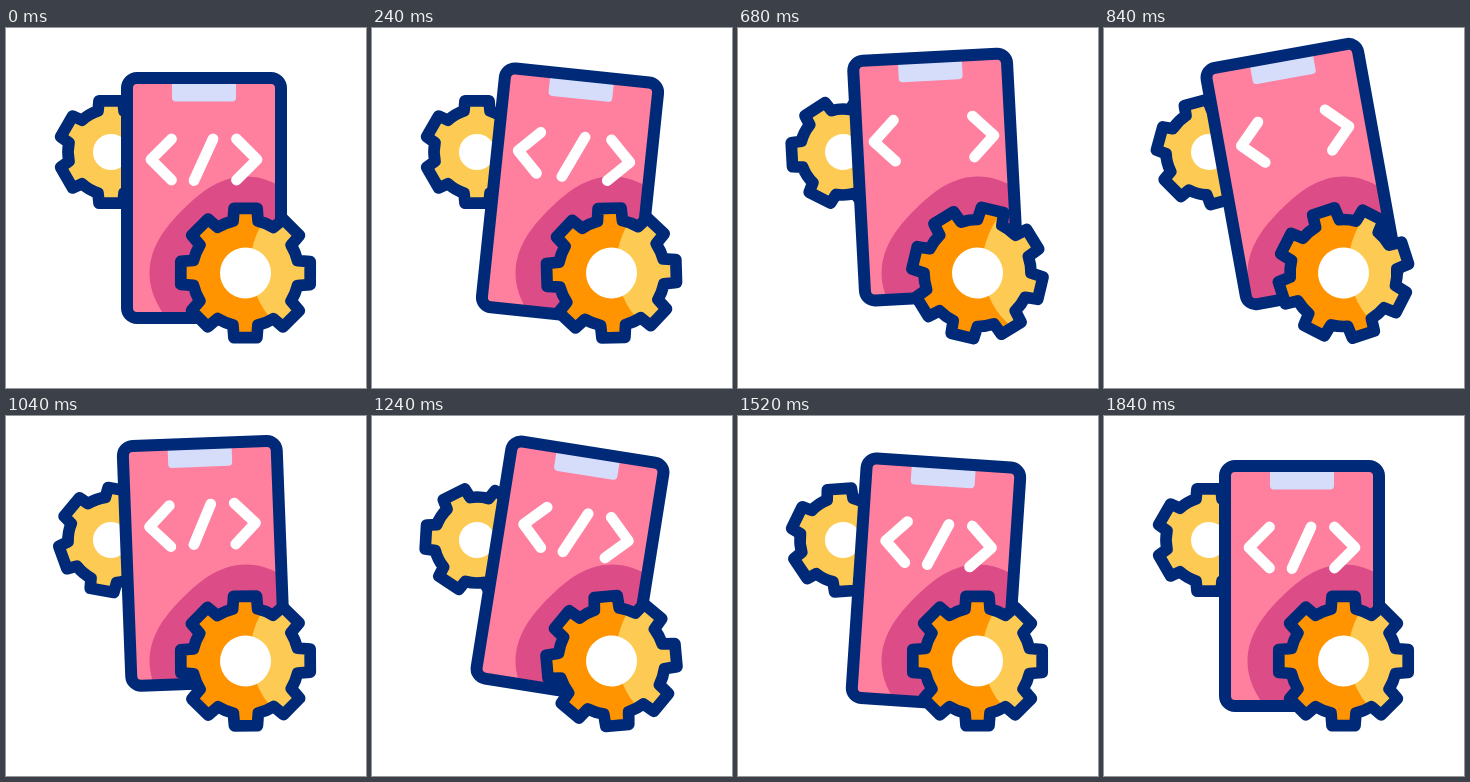
Animation, 360 px wide and 360 px high, one loop 1.88 s. Source, as an HTML page with a canvas:

```html
<!DOCTYPE html>
<html lang="en">
<head>
<meta charset="utf-8">
<title>App development</title>
<style>
html, body { margin: 0; width: 100%; height: 100%; overflow: hidden; background: #fff; }
canvas { display: block; width: 360px; height: 360px; }
</style>
</head>
<body>
<canvas id="stage"></canvas>
<script>
const LOOP = 1880, BEAT = 1280 / 3;
const NAVY = '#002a78', GOLD = '#fdcb53', ORANGE = '#ff9400';
const canvas = document.getElementById('stage');
const ctx = canvas.getContext('2d');
const dpr = window.devicePixelRatio || 1;
canvas.width = canvas.height = 360 * dpr;

// Smooth progress from 0 to 1 between two times
function ease(t, from, to) {
  const p = Math.min(1, Math.max(0, (t - from) / (to - from)));
  return p * p * (3 - 2 * p);
}

// Value of a track of [time, value] keys
function track(t, keys) {
  return keys.slice(1).reduce((v, [time, value], i) =>
    v + (value - keys[i][1]) * ease(t, keys[i][0], time), keys[0][1]);
}

function gearPath(teeth, outer, inner, half) {
  const path = new Path2D();
  const step = 2 * Math.PI / teeth;
  const base = Math.asin((half + 1) / inner);
  for (let i = 0; i < teeth; i++) {
    const a = i * step - Math.PI / 2;
    const c = Math.cos(a), s = Math.sin(a);
    path.arc(0, 0, inner, a - step + base, a - base);
    for (const w of [-half, half]) path.lineTo(outer * c - w * s, outer * s + w * c);
  }
  path.closePath();
  return path;
}

// Wavy disc, widest along the axes
function shadowPath() {
  const path = new Path2D();
  for (let a = 0; a < 2 * Math.PI; a += Math.PI / 60) {
    const r = 93 + 3.5 * Math.cos(4 * a);
    path.lineTo(r * Math.cos(a), r * Math.sin(a));
  }
  return path;
}

function disc(x, y, r, color) {
  ctx.fillStyle = color;
  ctx.beginPath();
  ctx.arc(x, y, r, 0, 2 * Math.PI);
  ctx.fill();
}

function fill(path, color) {
  ctx.fillStyle = color;
  ctx.fill(path);
}

function outline(path, color, width) {
  ctx.strokeStyle = color;
  ctx.lineWidth = width;
  ctx.stroke(path);
}

const backGear = gearPath(6, 51.2, 43, 12);
const frontGear = gearPath(8, 64.7, 53.5, 11.5);
const shadow = shadowPath();
const phone = new Path2D();
phone.roundRect(-77, -120, 154, 240, 10);
const notch = new Path2D();
notch.roundRect(-32, -118, 64, 21.5, 4);
const chevron = new Path2D('M10 -20.5L-10.5 0L10 20.5');

// Fills a turned gear, a fixed highlight inside it, then its rim
function drawGear(path, x, y, turn, color, hole, light) {
  ctx.save();
  ctx.translate(x, y);
  ctx.rotate(turn);
  fill(path, color);
  if (light) {
    ctx.save();
    ctx.clip(path);
    ctx.rotate(-turn);
    disc(85, -8, 80, light);
    ctx.restore();
  }
  outline(path, NAVY, 11.7);
  disc(0, 0, hole, '#fff');
  ctx.restore();
}

function drawCode(t) {
  const spread = track(t, [[0, 0], [590, 8.5], [940, 0]]);
  for (const side of [1, -1]) {
    ctx.save();
    ctx.translate(-side * (42.5 + spread), -38.5);
    ctx.scale(side, 1);
    outline(chevron, '#fff', 10.8);
    ctx.restore();
  }
  const drawn = 1 - ease(t, BEAT, BEAT * 1.5) + ease(t, BEAT * 2, BEAT * 2.5);
  if (drawn > 0.01) {
    const slash = new Path2D();
    slash.moveTo(9, -59);
    slash.lineTo(9 - 19 * drawn, -59 + 41.5 * drawn);
    outline(slash, '#fff', 10.8);
  }
}

function drawPhone(t) {
  const lift = track(t, [[60, 0], [860, -24], [930, -24], [1700, 0]]);
  const tilt = track(t, [[0, 0], [BEAT, 10], [BEAT * 2, -10.3], [BEAT * 3, 9.5], [BEAT * 4, 0]])
    * Math.PI / 180;
  ctx.save();
  ctx.translate(198, 170 + lift);
  ctx.rotate(tilt);
  fill(phone, '#ff7f9f');
  ctx.save();
  ctx.clip(phone);
  ctx.rotate(-tilt);
  ctx.translate(42, 75 - lift);
  fill(shadow, '#dc4c87');
  ctx.restore();
  fill(notch, '#d6ddfb');
  outline(phone, NAVY, 12);
  drawCode(t);
  ctx.restore();
}

function frame(now) {
  const t = now % LOOP;
  ctx.setTransform(dpr, 0, 0, dpr, 0, 0);
  ctx.fillStyle = '#fff';
  ctx.fillRect(0, 0, 360, 360);
  ctx.lineCap = ctx.lineJoin = 'round';

  const backTurn = ease(t, 240, 1680) * Math.PI * 2 / 3;
  const frontTurn = (0.7 * ease(t, 0, 1290) + 0.3 * Math.min(1, t / 1290)) * Math.PI * 2;
  drawGear(backGear, 105, 124, backTurn, GOLD, 18);
  drawPhone(t);
  drawGear(frontGear, 239.5, 245, frontTurn, ORANGE, 25.5, GOLD);
}

const start = performance.now();
function tick() {
  frame(performance.now() - start);
  requestAnimationFrame(tick);
}
tick();
</script>
</body>
</html>
```
